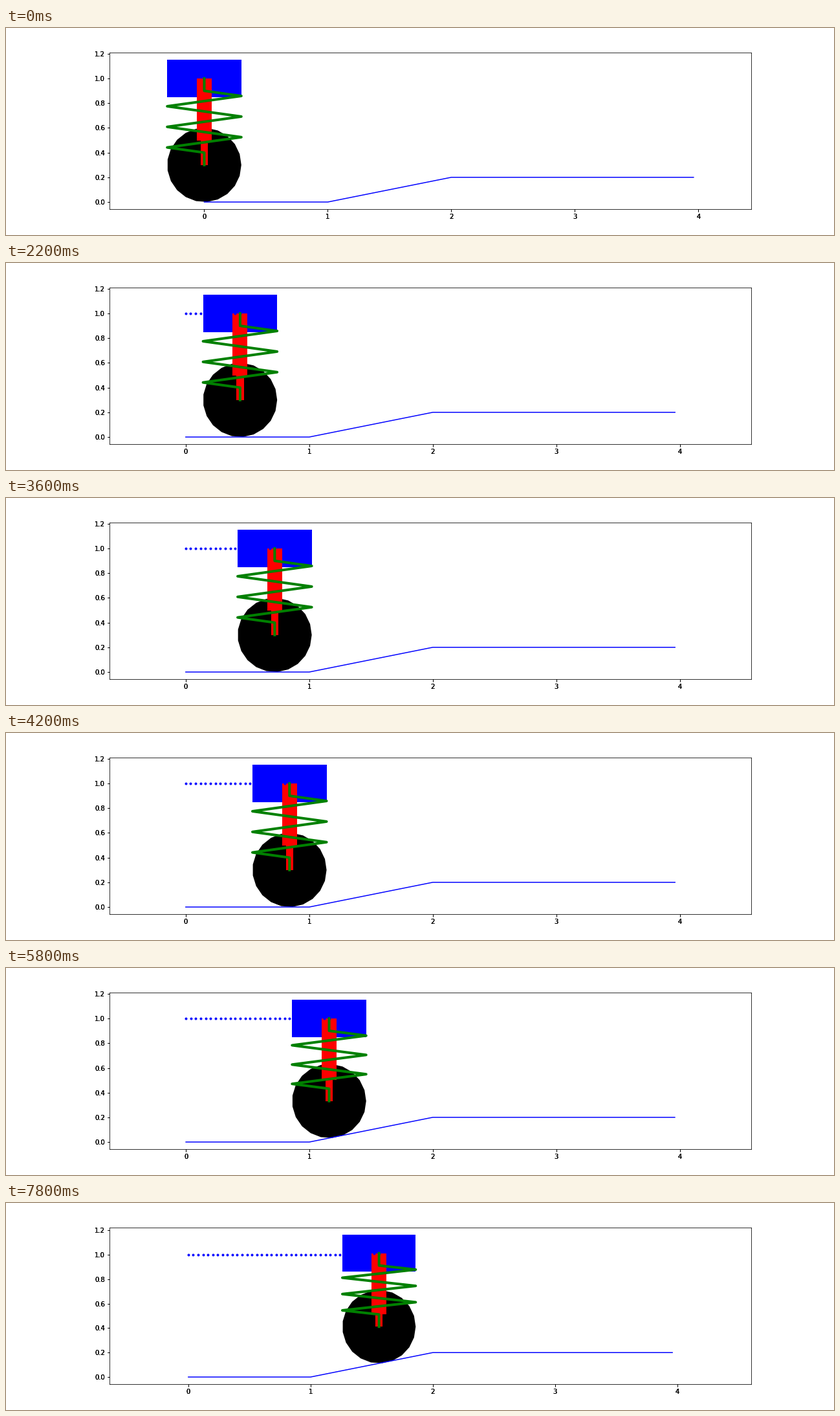
A matplotlib script that plays this animation: 1280x320 px, repeating every 8000 ms.

```python
import numpy as np
import matplotlib.pyplot as plt
from matplotlib.animation import FuncAnimation
from matplotlib.patches import Polygon, Rectangle

WIDTH, HEIGHT, DPI = 1280, 320, 72
FRAMES, INTERVAL = 40, 200
STEP = 0.04
ROAD_X, ROAD_Y = [0, 1, 2, 3.96], [0, 0, 0.2, 0.2]
RADIUS = 0.3
BODY_W, BODY_H = 0.6, 0.3
BOX = [0.125, 0.125, 0.775, 0.755]
ASPECT = BOX[2] * WIDTH / (BOX[3] * HEIGHT)

plt.rcParams["font.family"] = "DejaVu Sans"
plt.rcParams["font.size"] = 10

fig = plt.figure(figsize=(WIDTH / DPI, HEIGHT / DPI), dpi=DPI, facecolor="white")
ax = fig.add_axes(BOX)
# Overprinted axes make the ticks and labels heavier.
for _ in range(2):
    fig.add_axes(BOX, sharex=ax, sharey=ax, frameon=False)


def add_box(width, height, color):
    return ax.add_patch(Rectangle((0, 0), width, height, facecolor=color, linewidth=0))


angles = np.arange(21) * 2 * np.pi / 21
wheel_shape = RADIUS * np.column_stack([np.cos(angles), np.sin(angles)])

body = add_box(BODY_W, BODY_H, "blue")
wheel = ax.add_patch(Polygon(wheel_shape, facecolor="black", linewidth=0))
cylinder = add_box(0.12, 0.5, "red")
rod = add_box(0.06, 0.4, "red")
ax.plot(ROAD_X, ROAD_Y, color="blue", linewidth=1.5)
trail, = ax.plot([], [], "b.", markersize=6)
spring, = ax.plot([], [], color="green", linewidth=4)


def body_height(x):
    """Damped, delayed rise of the body once the wheel is on the ramp."""
    t = np.maximum(np.asarray(x) - 1, 0)
    return 1 + 0.03 * t**2 + 0.0175 * t**3


def spring_points(x, top, bottom):
    upper, lower = top - 0.1, bottom + 0.1
    turns = upper + (lower - upper) * np.arange(1, 12, 2) / 12
    ys = np.r_[top, upper, turns, lower, bottom]
    xs = x + RADIUS * np.array([0, 0, 1, -1, 1, -1, 1, -1, 0, 0])
    return xs, ys


def fit_view(x, top):
    """Equal scales, five percent margin in height."""
    height = 1.1 * top
    center = (min(0, x - BODY_W / 2) + ROAD_X[-1]) / 2
    half = height * ASPECT / 2
    ax.set_xlim(center - half, center + half)
    ax.set_ylim(-0.05 * top, 1.05 * top)


def update(frame):
    xs = STEP * np.arange(frame + 1)
    heights = body_height(xs)
    x, y = xs[-1], heights[-1]
    hub = RADIUS + np.interp(x, ROAD_X, ROAD_Y)

    body.set_xy((x - BODY_W / 2, y - BODY_H / 2))
    wheel.set_xy(wheel_shape + (x, hub))
    cylinder.set_xy((x - 0.06, y - 0.5))
    rod.set_xy((x - 0.03, hub))
    trail.set_data(xs, heights)
    spring.set_data(*spring_points(x, y, hub))
    fit_view(x, y + BODY_H / 2)
    return body, wheel, cylinder, rod, trail, spring


anim = FuncAnimation(fig, update, frames=FRAMES, interval=INTERVAL,
                     init_func=lambda: update(0), repeat=True, repeat_delay=0)
plt.show()
```
